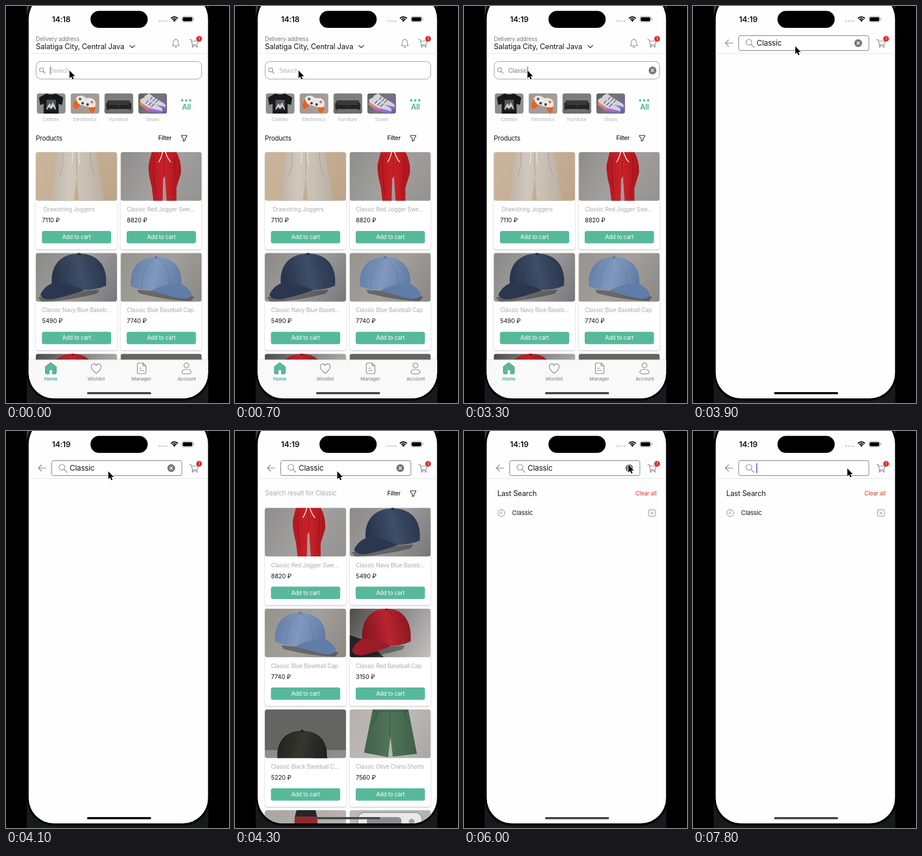
These frames come from a looping animation (388x690 px, 8 s). An HTML page with a canvas:

```html
<!DOCTYPE html>
<html lang="en">
<head>
<meta charset="utf-8">
<title>Shop search</title>
<style>
html, body { margin: 0; width: 100%; height: 100%; overflow: hidden; background: #000; }
canvas { display: block; width: 388px; height: 690px; }
</style>
</head>
<body>
<canvas id="stage"></canvas>
<script>
const W = 388, H = 690, LOOP = 8000;
const canvas = document.getElementById('stage');
const dpr = window.devicePixelRatio || 1;
canvas.width = W * dpr;
canvas.height = H * dpr;
const c = canvas.getContext('2d');

const GREEN = '#57b99b', GREY = '#8a8a8a', PALE = '#ababab', INK = '#161616', RED = '#e0302d';

// ---------- helpers ----------
function text(str, x, cy, size, color, weight = 400, align = 'left') {
  c.font = `${weight} ${size}px Inter, sans-serif`;
  c.letterSpacing = `${-0.013 * size}px`;
  c.textAlign = align;
  c.fillStyle = color;
  c.fillText(str, x, cy + size * 0.36);
}
function box(x, y, w, h, r, fill, stroke, lw = 1) {
  c.beginPath();
  c.roundRect(x, y, w, h, r);
  if (fill) { c.fillStyle = fill; c.fill(); }
  if (stroke) { c.strokeStyle = stroke; c.lineWidth = lw; c.stroke(); }
}
function dot(x, y, r, fill) {
  c.beginPath();
  c.arc(x, y, r, 0, Math.PI * 2);
  c.fillStyle = fill;
  c.fill();
}
function line(d, color, lw = 1.1) {
  c.strokeStyle = color;
  c.lineWidth = lw;
  c.lineCap = c.lineJoin = 'round';
  c.stroke(new Path2D(d));
}
function shape(d, fill) {
  c.fillStyle = fill;
  c.fill(new Path2D(d));
}
function at(x, y, draw, sx = 1, sy = sx) {
  c.save();
  c.translate(x, y);
  c.scale(sx, sy);
  draw();
  c.restore();
}
function blend(x0, y0, x1, y1, ...colors) {
  const g = c.createLinearGradient(x0, y0, x1, y1);
  colors.forEach((col, i) => g.addColorStop(i / (colors.length - 1), col));
  return g;
}
function photo(x, y, w, h, r, draw) {
  at(x, y, () => {
    c.beginPath();
    c.roundRect(0, 0, w, h, r);
    c.clip();
    draw(w, h);
  });
}
function back(...colors) {
  c.fillStyle = blend(0, 0, 141, 84, ...colors);
  c.fillRect(0, 0, 141, 85);
}
const clamp = v => Math.max(0, Math.min(1, v));
const ease = v => { v = clamp(v); return v * v * (3 - 2 * v); };

// ---------- product pictures ----------
function cap(x, y, sx, sy, light, dark, brim) {
  at(x, y, () => {
    shape('M10 56Q50 58 106 68L100 75Q60 74 14 62Z', 'rgba(20,20,24,.4)');
    shape('M0 50C-3 18 14 0 42 0C70 0 87 18 84 48Q62 46 40 57Q16 57 0 50Z',
      blend(0, 10, 84, 30, dark, light, dark));
    line('M42 0C58 12 64 30 64 48M42 0C24 12 18 32 18 54', 'rgba(0,0,0,.16)', 0.8);
    shape('M34 57Q60 44 84 46Q97 52 102 64Q99 72 84 71Q62 67 34 57Z', brim);
    dot(42, 0.6, 2.4, dark);
  }, sx, sy);
}
const pictures = {
  beige() {
    back('#cab59b', '#c5af95', '#bda489');
    shape('M37 0L26 85H66L71 42L75 85H119L104 0Z', blend(26, 0, 119, 0, '#bdb3a5', '#d0c8bd', '#c8bfb3', '#b9afa1'));
    line('M71 0V42M46 0Q50 20 42 40M95 0Q94 20 102 40', 'rgba(110,98,82,.4)', 0.9);
    line('M64 0L63 20M74 0L76 22', '#e8e2d8', 1.5);
  },
  jogger() {
    back('#8f8d8b', '#a3a19f', '#949290');
    shape('M54 0H97Q106 16 105 36L97 62V85H80L77 42L74 46L73 85H57L54 60Q47 34 49 20Z',
      blend(46, 0, 106, 0, '#ad161e', '#cb2229', '#a9141c'));
    line('M76 0V42M58 8Q56 36 61 74M94 10Q96 40 90 74', 'rgba(80,0,8,.4)', 0.9);
    line('M73 0Q70 12 66 17M78 0Q82 12 87 17', '#f3e6e4', 1.5);
  },
  navy() {
    back('#8c8a88', '#a09e9c', '#77777a');
    cap(122, 1, -1.12, 1.12, '#3e4d68', '#28344b', '#2b374f');
  },
  blue() {
    back('#96938f', '#a3a09c', '#8b8884');
    cap(18, 7, 1.04, 1.02, '#8199be', '#627ca5', '#607ca8');
  },
  red() {
    back('#4c4c4b', '#8d8c8a', '#c4c1bd');
    shape('M0 46L30 56L60 85H0Z', 'rgba(12,12,12,.75)');
    cap(106, 0, -1, 1.14, '#b9252f', '#851520', '#9c1c27');
  },
  black() {
    c.fillStyle = '#646462';
    c.fillRect(0, 0, 141, 71);
    c.fillStyle = '#8f8e8b';
    c.fillRect(0, 71, 141, 14);
    cap(22, 37, 1.02, 1, '#35362f', '#1f211d', '#1b1c19');
  },
  shorts() {
    back('#b5b0ad', '#c0bbb8', '#aaa6a3');
    shape('M40 0H102L117 77L75 82L71 48L67 83L25 75Z', blend(25, 0, 117, 0, '#40614a', '#52755a', '#3d5f46'));
    line('M40 4H102M70 4V48M48 5Q46 20 38 26M95 5Q97 18 105 24', 'rgba(20,45,25,.5)', 0.9);
  },
  skirt() {
    back('#a9a5a2', '#bab6b3');
    shape('M55 0H88L91 12H52Z', '#25252a');
    shape('M52 11H91L95 84H48Z', '#8f2a2c');
  },
  gadget() {
    back('#b9b9b9', '#b0b0b0');
    box(14, 4, 112, 80, 12, '#e9e9e9', '#a0a0a0', 2);
    box(30, 12, 60, 40, 6, '#8b8d90');
    dot(108, 20, 5, '#9fa1a4');
  }
};

const goods = {
  beige: [' Drawstring Joggers', 7110],
  jogger: ['Classic Red Jogger Swe...', 8820],
  navy: ['Classic Navy Blue Baseb...', 5490],
  blue: ['Classic Blue Baseball Cap', 7740],
  red: ['Classic Red Baseball Cap', 3150],
  black: ['Classic Black Baseball C...', 5220],
  shorts: ['Classic Olive Chino Shorts', 7560],
  skirt: ['Classic Red Skirt', 6100],
  gadget: ['Classic Console', 9900]
};

function card(key, x, y) {
  const [title, price] = goods[key];
  c.save();
  c.shadowColor = 'rgba(0,0,0,.25)';
  c.shadowBlur = 2.5 * dpr;
  c.shadowOffsetY = dpr;
  box(x, y, 141, 169, 4, '#fff');
  c.restore();
  photo(x, y, 141, 84.5, 4, pictures[key]);
  text(title, x + 10.8, y + 99.5, 9.8, PALE);
  text(`${price} ₽`, x + 10.8, y + 118.5, 10.5, INK);
  box(x + 10.5, y + 137, 120.5, 21.5, 3.5, GREEN);
  text('Add to cart', x + 70.7, y + 147.8, 9.7, '#fff', 400, 'center');
}
function grid(keys, top) {
  keys.forEach((k, i) => card(k, i % 2 ? 199.5 : 52, top + 175.2 * (i >> 1)));
}

// ---------- category thumbnails ----------
const categories = [
  ['Clothes', () => {
    back('#8b8b8b', '#9a9a9a');
    shape('M17 0Q25 4 33 0L46 7L44 20L38 18V36H12V18L6 20L4 7Z', '#17181a');
    box(17, 11, 16, 18, 0, '#55585b');
    shape('M17 26L22 17L25 21L28 15L33 25V29H17Z', '#c9cccf');
    shape('M17 29L21 24L25 27L29 23L33 29Z', '#2b2d30');
  }],
  ['Electronics', () => {
    back('#a09893', '#b0a9a5');
    at(25, 17, () => {
      c.rotate(0.25);
      shape('M-16 -8Q-10 -14 0 -9Q11 -14 17 -7Q22 8 17 14Q12 15 7 5H-6Q-11 16 -16 14Q-22 8 -16 -8Z', '#ebe7e4');
      shape('M-17 -4Q-22 8 -16 14Q-11 16 -6 5Q-13 4 -17 -4ZM19 1Q21 10 17 14Q12 15 7 5Q14 5 19 1Z', '#e0652c');
      dot(-10, -5, 2.3, '#555');
      dot(-4, 1, 2.3, '#444');
      dot(5, 1, 2.3, '#444');
      dot(11, -5, 2.3, '#d8703a');
    });
  }],
  ['Furniture', () => {
    back('#7c7b7a', '#8b8988');
    c.fillStyle = '#706f6d';
    c.fillRect(0, 27, 50, 9);
    box(5, 12, 40, 12, 2, '#38393b');
    box(3, 16, 5, 12, 2, '#28292c');
    box(42, 16, 5, 12, 2, '#28292c');
    box(7, 20, 36, 7, 1, '#222326');
    line('M6 28V30M44 28V30M25 14V25', '#3d3e41', 1);
  }],
  ['Shoes', () => {
    c.fillStyle = blend(0, 0, 50, 35, '#5b5b62', '#75757c', '#7d5a96');
    c.fillRect(0, 0, 50, 35);
    const shoe = () => {
      shape('M2 6L11 1L21 9L41 21Q46 27 41 29L18 23L3 13Z', '#d3d4da');
      shape('M2 10L18 21L43 27L41 31L15 26L1 15Z', blend(2, 0, 44, 0, '#e58a48', '#b561d2', '#5688de'));
      line('M17 8L13 13M23 11L18 16M28 14L23 19', '#50535f', 1.3);
    };
    at(9, -1, shoe, 0.9);
    at(1, 5, shoe, 0.95);
  }]
];

// ---------- icons ----------
function lens(x, y, r, color) {
  c.beginPath();
  c.arc(x, y, r, 0, Math.PI * 2);
  c.strokeStyle = color;
  c.lineWidth = 1.1;
  c.stroke();
  const k = r * 0.72, e = r * 1.75;
  line(`M${x + k} ${y + k}L${x + e} ${y + e}`, color, 1.2);
}
function clearButton(x, y) {
  dot(x, y, 6.7, '#757575');
  line(`M${x - 2.2} ${y - 2.2}L${x + 2.2} ${y + 2.2}M${x + 2.2} ${y - 2.2}L${x - 2.2} ${y + 2.2}`, '#fff', 1.3);
}
function cart() {
  line('M319.5 58.5H322L324.5 67.5H332.5L334.5 61H322.8M324.5 67.5L323.8 69.3H333', GREY);
  dot(325, 71, 1.2, GREY);
  dot(332, 71, 1.2, GREY);
  dot(336, 57, 5, RED);
  text('1', 336, 57, 5.5, '#fff', 500, 'center');
}
function filter(cy) {
  text('Filter', 265, cy, 9.8, INK, 500);
  at(310, cy, () => line('M-4.7 -4.5H4.7V-3L1.5 1V4.2L-1.5 5.2V1L-4.7 -3Z', INK, 1.1));
}
function statusBar(t) {
  text(t < 2300 ? '14:18' : '14:19', 80, 23, 13.4, '#111', 600);
  box(147, 8.5, 99.5, 29.5, 14.75, '#000');
  for (let i = 0; i < 4; i++) dot(266.5 + i * 4.4, 26.3, 1.2, '#bdbdbd');
  c.lineCap = 'butt';
  c.strokeStyle = '#000';
  c.lineWidth = 2;
  for (const r of [8.3, 5]) {
    c.beginPath();
    c.arc(293, 27.3, r, -Math.PI * 0.76, -Math.PI * 0.24);
    c.stroke();
  }
  shape('M293 27.8L290.7 25Q293 23.2 295.3 25Z', '#000');
  box(306, 18, 19.5, 9.8, 3, null, '#a5a5a5', 0.9);
  box(307.4, 19.4, 16.7, 7, 1.8, '#000');
  box(326.6, 21.2, 1.2, 3.4, 0.6, '#a5a5a5');
}
function divider() {
  c.fillStyle = '#e6e6e6';
  c.fillRect(39, 82, 313, 1);
}
function caret(x, y, h, w, color, alpha) {
  c.save();
  c.globalAlpha *= alpha;
  c.fillStyle = color;
  c.fillRect(x, y, w, h);
  c.restore();
}
function blink(t) {
  const p = ((t % 1000) + 1000) % 1000;
  return p < 600 ? 1 : p < 700 ? (700 - p) / 100 : p < 900 ? 0 : (p - 900) / 100;
}

// ---------- screens ----------
const keyTimes = [1050, 1200, 1350, 1500, 1650, 1950, 2200];

function home(t) {
  c.fillStyle = '#fefefe';
  c.fillRect(36, 0, 320, H);
  text('Delivery address', 52, 57, 9.8, '#777');
  text('Salatiga City, Central Java', 52, 70.5, 12.8, INK);
  line('M215.5 68.5L219.7 72.5L224 68.5', '#333', 1.2);
  line('M289.5 69Q291.3 67 291.3 62.5Q291.5 58.5 295.5 58.3Q299.5 58.5 299.7 62.5Q299.7 67 301.5 69ZM293.8 71Q295.5 72.6 297.2 71M295.5 57V58', GREY);
  cart();
  divider();

  const typed = 'Classic'.slice(0, keyTimes.filter(k => t >= k).length);
  box(52.5, 96.5, 288, 30.5, 8, '#fff', '#a0a0a0');
  lens(62, 111, 3.5, GREY);
  if (typed) {
    text(typed, 77, 112, 10.2, '#777');
    clearButton(328, 112);
  } else text('Search', 77, 112, 10.2, '#b5b5b5');
  c.font = '400 10.2px Inter, sans-serif';
  const cx = 76.6 + c.measureText(typed).width;
  const typing = t > keyTimes[0] && t < 2300;
  caret(cx, 105, 14, 1, '#555', typing ? 1 : blink(t < 2300 ? t : t - 2300));

  categories.forEach(([name, draw], i) => {
    const x = 53.5 + i * 58.9;
    photo(x, 152, 50, 35, 4, draw);
    text(name, x + 24.8, 197, 8.1, '#b0b0b0', 400, 'center');
  });
  for (const x of [306.5, 313.5, 320.5]) dot(x, 164, 2.1, GREEN);
  text('All', 314, 175.5, 12.5, GREEN, 700, 'center');

  text('Products', 52, 229.5, 11.2, INK);
  filter(229.5);
  grid(['beige', 'jogger', 'navy', 'blue', 'red', 'black'], 254);

  c.fillStyle = '#f9f9f9';
  c.fillRect(36, 615, 320, 75);
  c.fillStyle = '#dedede';
  c.fillRect(36, 614.5, 320, 1);
  const house = 'M78 619.8L87.5 627V637Q87.5 639.5 85 639.5H81V633Q78 630.5 75 633V639.5H71Q68.5 639.5 68.5 637V627Z';
  shape(house, GREEN);
  line(house, '#4a9c83', 1);
  line('M157 638.5C149 632.5 148 629 148.5 626C149.5 621 155 620.5 157 625C159 620.5 164.5 621 165.5 626C166 629 165 632.5 157 638.5Z', GREY, 1.2);
  line('M231 620.5H238.5L243.5 625.5V636.5Q243.5 639 241 639H231Q228.5 639 228.5 636.5V623Q228.5 620.5 231 620.5ZM238.5 621V625.5H243M232.5 629.5H236M232.5 633.5H239.5', GREY, 1.2);
  line('M314 620.3A4.3 4.3 0 1 1 313.9 620.3ZM306 637Q306 631.5 314 631.5Q322 631.5 322 637Q322 639.5 314 639.5Q306 639.5 306 637Z', GREY, 1.2);
  ['Home', 'Wishlist', 'Manager', 'Account'].forEach((name, i) =>
    text(name, 78 + i * 78.8, 648, 8.2, i ? GREY : GREEN, i ? 500 : 700, 'center'));
}

function search(t) {
  const cleared = t >= 6500;
  c.fillStyle = '#fefefe';
  c.fillRect(36, 0, 320, H);
  line('M69.5 64.5H56.5M61.8 59L56.3 64.5L61.8 70', GREY, 1.2);
  box(79.5, 51.5, 226.5, 26, 3, '#fff', '#7c7c7c');
  lens(97.3, 63, 5, GREY);
  cart();
  divider();
  if (cleared) {
    caret(110.2, 56, 17, 1.6, '#4a62c8', blink(t - 7600));
  } else {
    text('Classic', 110.8, 64.5, 13.1, INK);
    clearButton(287.5, 64.5);
  }

  if (t >= 5700) {
    text('Last Search', 58, 108.5, 12.6, INK);
    text('Clear all', 335, 108.5, 9.9, '#d9322f', 400, 'right');
    c.beginPath();
    c.arc(65, 142.5, 6, 0, Math.PI * 2);
    c.strokeStyle = GREY;
    c.lineWidth = 1;
    c.stroke();
    line('M65 139V143H61.8', GREY, 1);
    text('Classic', 83.5, 142.5, 11, INK);
    box(321, 137, 12, 11, 1.5, null, GREY);
    line('M324.7 140.2L329.3 144.8M329.3 140.2L324.7 144.8', GREY, 1);
  } else if (t >= 4200) {
    text('Search result for Classic', 52.5, 108.5, 11.1, PALE);
    filter(108.5);
    grid(['jogger', 'navy', 'blue', 'red', 'black', 'shorts', 'skirt', 'gadget'], 133.5);
  }
}

// ---------- pointer ----------
const stops = [
  [0, 110.5, 112], [3400, 110.5, 112], [3800, 178, 70], [5000, 178, 70],
  [5500, 286, 58.5], [6700, 286, 58.5], [7300, 268.5, 65], [LOOP, 268.5, 65]
];
function pointer(t) {
  const i = stops.findIndex(s => s[0] > t);
  const [t0, x0, y0] = stops[i - 1], [t1, x1, y1] = stops[i];
  const k = ease((t - t0) / (t1 - t0));
  at(x0 + (x1 - x0) * k, y0 + (y1 - y0) * k, () => {
    const d = 'M0 0V14.2L3.2 11.2L5.4 16.3L7.7 15.3L5.5 10.4H10Z';
    line(d, '#fff', 1.6);
    shape(d, '#000');
  }, 0.95);
}

function draw(t) {
  c.setTransform(dpr, 0, 0, dpr, 0, 0);
  c.fillStyle = '#000';
  c.fillRect(0, 0, W, H);
  c.fillStyle = blend(0, 0, 0, H, '#363b42', '#17191b');
  c.fillRect(36, 0, 316, H);
  c.save();
  c.beginPath();
  c.rect(36, 0, 316, H);
  c.clip();
  box(36, -26, 319, 712, 48, '#000');
  c.beginPath();
  c.roundRect(39.5, -22, 312, 704, 44);
  c.clip();

  const fade = clamp((t - 3400) / 250);
  if (fade < 1) home(t);
  if (fade > 0) {
    c.save();
    c.globalAlpha = fade;
    search(t);
    c.restore();
  }
  statusBar(t);
  box(141, 671, 111.5, 3.8, 1.9, t >= 3650 && t < 4200 ? '#080808' : '#444');
  pointer(t);
  c.restore();
}

function tick(now) {
  draw(now % LOOP);
  requestAnimationFrame(tick);
}
requestAnimationFrame(tick);
</script>
</body>
</html>
```
